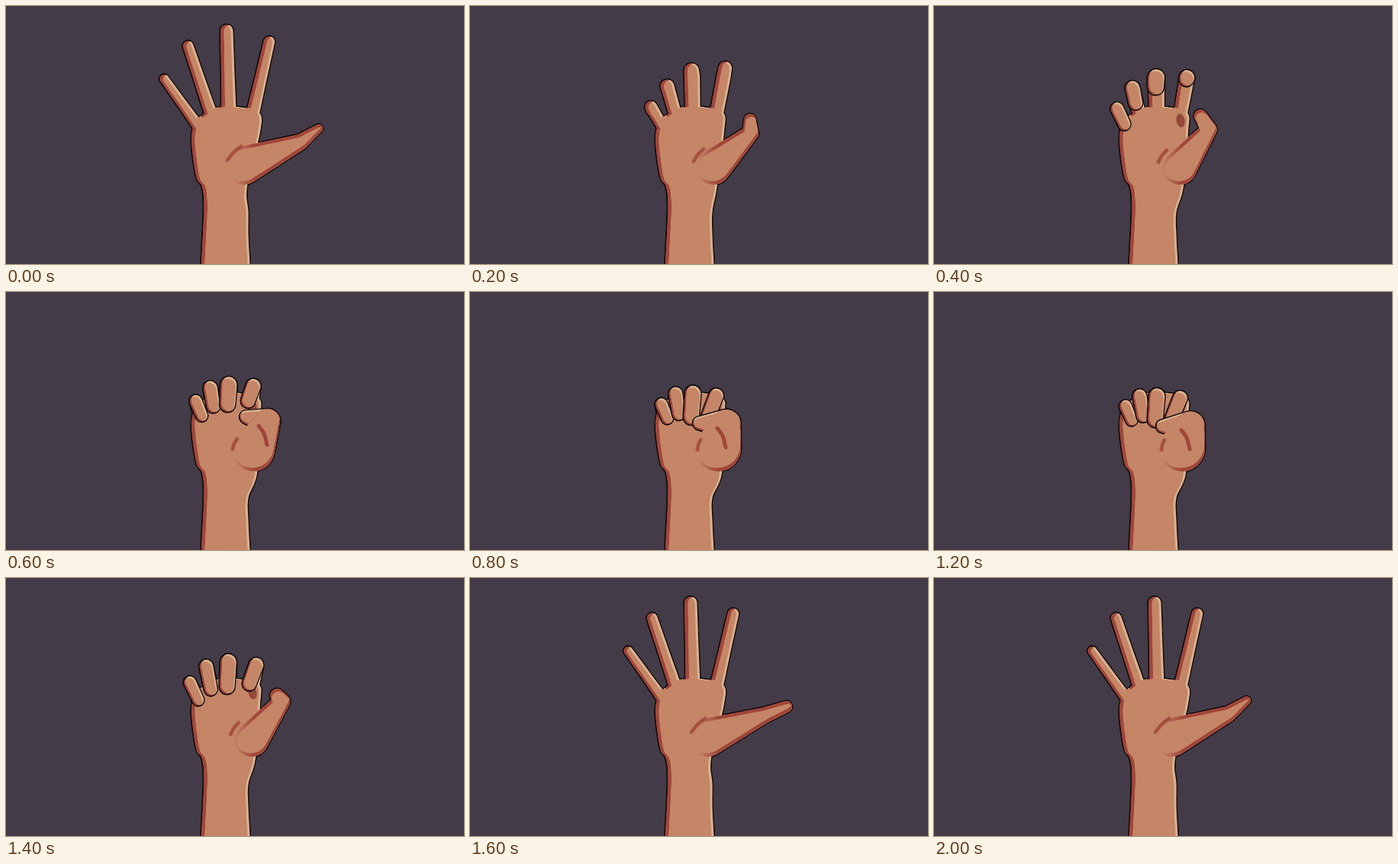
Animation, 600 px wide and 338 px high, one loop 2100 ms. Source, as an HTML page with a canvas:

```html
<!DOCTYPE html>
<html lang="en">
<head>
<meta charset="utf-8">
<title>Hand closing and opening</title>
<style>
  html, body { margin: 0; width: 100%; height: 100%; overflow: hidden; background: #433b47; }
  canvas { display: block; width: 600px; height: 338px; }
</style>
</head>
<body>
<canvas id="stage" width="600" height="338"></canvas>
<script>
const ctx = document.getElementById('stage').getContext('2d');
const BACK = '#433b47', INK = '#0d090b', SKIN = '#c48667', SHADOW = '#a1463a', LIGHT = '#dab28f';
const STEP = 100, LOOP = 2100, OUTLINE = 2.8;
const PALM = [285, 230];

const FINGERS = [
  { root: [252, 158], angle: -35.6, length: 77, r: 6 },
  { root: [270, 146], angle: -18.6, length: 98.7, r: 7 },
  { root: [292, 146], angle: -1.5, length: 113.5, r: 8.4 },
  { root: [322, 146], angle: 12.9, length: 101.6, r: 7.4 }
];

// lift: root to knuckle, drop: knuckle to tip towards the palm (little finger, index),
// extend: knuckle to tip straight on; all as shares of the finger's length.
// thumb: circles x, y, r at mound, joint and tip.
const open = {
  curl: 0, spread: 1, lift: [0.5, 0.5], extend: 0.5, drop: [0, 0], swell: 0,
  thumb: [[311, 209, 25], [385, 178.5, 10.5], [409.5, 160.5, 5.5]]
};
const wide = { ...open, thumb: [open.thumb[0], [385, 180, 10.5], [414.5, 168.5, 7.5]] };
const claw = {
  curl: 0.5, spread: 0.78, lift: [0.34, 0.52], extend: 0, drop: [0.29, 0.02], swell: 2,
  thumb: [[322, 212, 22], [360, 162, 10.5], [349, 144, 8.5]]
};
const loose = {
  ...claw, curl: 0.55, lift: [0.31, 0.32], drop: [0.33, 0.26], swell: 1.5,
  thumb: [claw.thumb[0], [361, 162, 11], [355, 154, 9]]
};
const fist = {
  curl: 1, spread: 0.2, lift: [0.14, 0.1], extend: 0, drop: [0.26, 0.28], swell: 1.5,
  thumb: [[325, 205, 30], [336, 172.5, 18.5], [300.5, 172, 8.5]]
};
const rest = {
  ...fist, lift: [0.11, 0.07],
  thumb: [fist.thumb[0], [336, 175, 18.5], [299.5, 176, 8.5]]
};

const KEYS = [[0, open], [400, claw], [800, fist], [1200, rest], [1400, loose],
  [1600, wide], [1800, open], [LOOP, open]];

function mix(a, b, k) {
  if (typeof a === 'number') return a + (b - a) * k;
  if (Array.isArray(a)) return a.map((v, i) => mix(v, b[i], k));
  return Object.fromEntries(Object.keys(a).map(key => [key, mix(a[key], b[key], k)]));
}

function poseAt(time) {
  const t = Math.floor((time % LOOP) / STEP) * STEP;
  const next = KEYS.findIndex(key => key[0] > t);
  const [[t0, from], [t1, to]] = [KEYS[next - 1], KEYS[next]];
  return mix(from, to, Math.sin((t - t0) / (t1 - t0) * Math.PI / 2));
}

// Knuckle and tip circles of one finger.
function bend({ root, angle, length, r }, i, pose) {
  const turn = angle * pose.spread * Math.PI / 180;
  const dir = [Math.sin(turn), -Math.cos(turn)];
  const lift = mix(...pose.lift, i / 3) * length;
  const drop = mix(...pose.drop, i / 3) * length;
  const knuckle = root.map((v, n) => v + dir[n] * lift);
  const inward = PALM.map((v, n) => v - knuckle[n]);
  const far = Math.hypot(...inward);
  const tip = knuckle.map((v, n) => v + dir[n] * pose.extend * length + inward[n] / far * drop);
  return [[...knuckle, r + pose.swell + 0.5], [...tip, r + pose.swell]];
}

// Smooth curve through the points.
function curve(pts) {
  const path = new Path2D();
  const at = i => pts[Math.max(0, Math.min(pts.length - 1, i))];
  path.moveTo(...pts[0]);
  for (let i = 0; i < pts.length - 1; i++) {
    const [p, a, b, n] = [at(i - 1), at(i), at(i + 1), at(i + 2)];
    path.bezierCurveTo(a[0] + (b[0] - p[0]) / 6, a[1] + (b[1] - p[1]) / 6,
      b[0] - (n[0] - a[0]) / 6, b[1] - (n[1] - a[1]) / 6, ...b);
  }
  return path;
}

// Hull of two circles.
function capsule([x1, y1, r1], [x2, y2, r2]) {
  const path = new Path2D();
  const dist = Math.hypot(x2 - x1, y2 - y1) || 1;
  const dir = Math.atan2(y2 - y1, x2 - x1);
  const side = Math.acos(Math.max(-1, Math.min(1, (r1 - r2) / dist)));
  path.arc(x2, y2, r2, dir - side, dir + side);
  path.arc(x1, y1, r1, dir + side, dir - side + Math.PI * 2);
  path.closePath();
  return path;
}

function join(...paths) {
  const all = new Path2D();
  paths.forEach(path => all.addPath(path));
  return all;
}

function armAndPalm([mx, my, mr]) {
  const path = curve([[254, 370], [255.5, 338], [259, 265], [256.5, 237], [249, 224], [243, 182],
    [244.5, 160], [254, 145], [278, 132.5], [307, 132.5], [332, 140], [333, 165],
    [mx + 5, my + mr + 2], [317.5, 270], [317.5, 300], [319.5, 338], [321, 370]]);
  path.closePath();
  return path;
}

function line(path, color, width) {
  ctx.strokeStyle = color;
  ctx.lineWidth = width;
  ctx.stroke(path);
}

function fill(path, color) {
  ctx.fillStyle = color;
  ctx.fill(path);
}

// Outline, then skin between a shadow edge and a light edge.
function solid(path, [sx, sy], [lx, ly]) {
  line(path, INK, OUTLINE);
  ctx.save();
  ctx.clip(path);
  fill(path, SHADOW);
  ctx.translate(sx, sy);
  fill(path, LIGHT);
  ctx.clip(path);
  ctx.translate(lx - sx, ly - sy);
  fill(path, SKIN);
  ctx.restore();
}

// Shadow under the thumb and on its upper edge, fading out into the palm.
function shadeThumb(path, upper) {
  const fade = ctx.createLinearGradient(298, 0, 325, 0);
  fade.addColorStop(0, SKIN);
  fade.addColorStop(1, SHADOW);
  fill(path, fade);
  ctx.save();
  ctx.clip(path);
  ctx.translate(-1, -4.5);
  ctx.clip(path);
  ctx.translate(1 + upper / 2, 4.5 + upper);
  fill(path, SKIN);
  ctx.restore();
}

function draw(time) {
  const pose = poseAt(time);
  const [mound, joint, tip] = pose.thumb;
  const bent = FINGERS.map((finger, i) => bend(finger, i, pose));
  const fronts = bent.map(([knuckle, end]) => capsule(knuckle, end));
  const backs = bent.map(([knuckle], i) =>
    capsule([...FINGERS[i].root, FINGERS[i].r + 1.4], knuckle));
  const lower = capsule(mound, joint), upper = capsule(joint, tip);
  const fingersOver = pose.curl > 0.4, thumbOver = pose.curl > 0.8;

  ctx.fillStyle = BACK;
  ctx.fillRect(0, 0, 600, 338);
  ctx.lineCap = ctx.lineJoin = 'round';

  solid(join(armAndPalm(mound), lower, upper, ...backs, ...fronts), [5, 0.5], [-3, 0.8]);
  if (!thumbOver) shadeThumb(join(lower, upper), 4);
  if (fingersOver) {
    const hollow = new Path2D();
    hollow.ellipse(323, 150, 5.5, 9, -0.2, 0, Math.PI * 2);
    fill(hollow, '#93483b');
    fronts.forEach(path => solid(path, [2.5, -1.5], [-1.5, 2.5]));
  }
  if (thumbOver) {
    const [x, y] = joint;
    solid(upper, [1, -2.5], [-1, 2.5]);
    shadeThumb(lower, 0);
    line(curve([[x - 12, y + 6], [x - 5, y + 16], [x - 1, y + 31]]), SHADOW, 5);
  }

  const crease = curve(mix([[290, 202], [298, 192], [308, 184]],
    [[298, 207], [299, 200], [302, 194]], pose.curl));
  line(crease, 'rgba(161,70,58,.3)', 6);
  line(crease, 'rgba(161,70,58,.85)', 3.6);
}

function tick() {
  draw(performance.now());
  requestAnimationFrame(tick);
}
tick();
</script>
</body>
</html>
```
